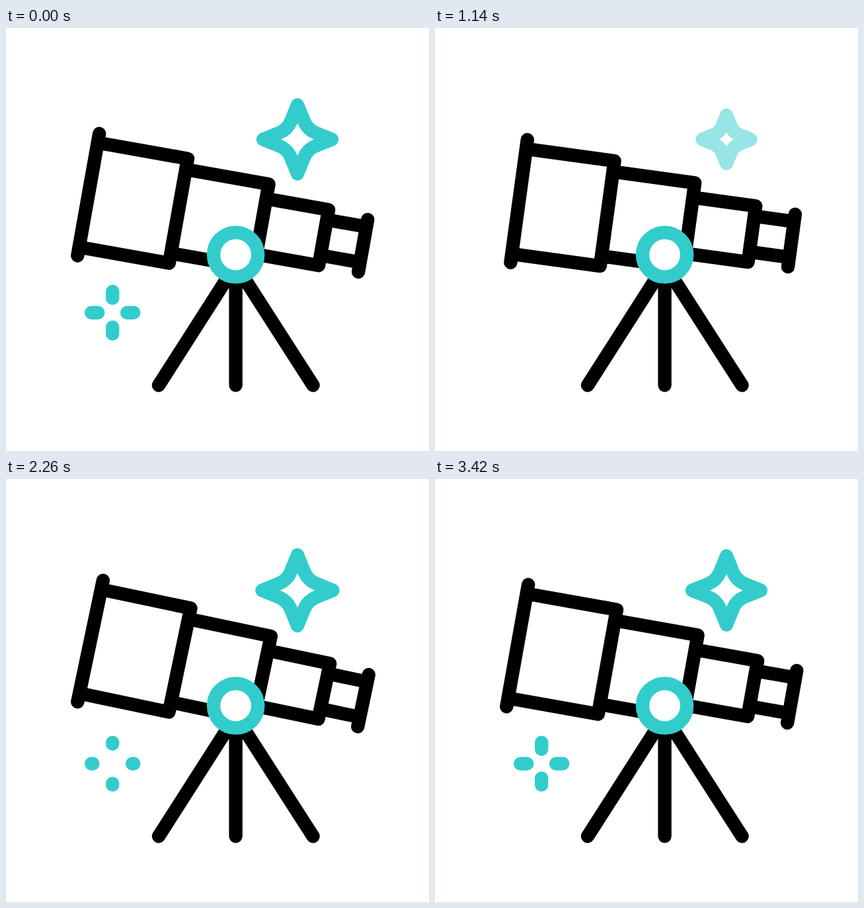
Write an HTML page that moves like this. It is 640 by 640 pixels and loops after 3.6 s.

```html
<!DOCTYPE html>
<html lang="en">
<head>
<meta charset="utf-8">
<title>Telescope</title>
<style>
  html, body { margin: 0; width: 100%; height: 100%; overflow: hidden; background: #fff; }
  svg { display: block; width: 100vw; height: 100vh; }
  path, circle { fill: none; stroke: #000; stroke-width: 20.4; stroke-linecap: round; stroke-linejoin: round; }
  .teal { stroke: #33cccc; }
</style>
</head>
<body>
<svg viewBox="0 0 640 640">
  <path id="star" class="teal" transform="translate(441 168.5)"/>
  <path id="spark" class="teal" transform="translate(161.2 430.8)"/>
  <path d="M333 381L231 540.6M347.6 385V540.6M362 381L464.5 540.6"/>
  <path id="tube"/>
  <circle class="teal" cx="347.6" cy="343" r="33.6" style="fill:#fff"/>
</svg>
<script>
const LOOP = 3600, BEGIN = 80, END = 3420, TWINKLE = 1705;
const [star, spark, tube] = ['star', 'spark', 'tube'].map(id => document.getElementById(id));

// Progress from 0 to 1 between two times, even or eased at both ends
const even = (t, from, to) => Math.min(1, Math.max(0, (t - from) / (to - from)));
const ease = (t, from, to) => (1 - Math.cos(Math.PI * even(t, from, to))) / 2;

function drawTube(t) {
  // Dips while the sections pull in, swings up as they shoot out, then rocks back
  const tilt = 10.1 - 8.8 * ease(t, BEGIN, 935) + 24.2 * ease(t, 935, 1530)
    - 25.8 * ease(t, 1530, 2940) + 10.4 * ease(t, 2940, END);
  const pull = ease(t, BEGIN, 940) - 1.33 * ease(t, 940, 1260) + 0.33 * ease(t, 1260, 1615);
  const front = -235.4 + 80 * pull, middle = -97 + 33 * pull;

  tube.setAttribute('transform', `translate(347.6 343) rotate(${tilt})`);
  tube.setAttribute('d',
    `M${front} -144.2V43.4` +
    `M${front} -130.3H${middle}V30.2H${front}` +
    `M${middle} -113.8H30.5V-10M${middle} 15H0` +
    'M30.5 -91.6H126.4V-6H30.5' +
    'M126.4 -76.2H187.2M126.4 -21.6H187.2M187.2 -87.3V-7');
}

// One arm of the star, turned four times
function starPath(size) {
  const points = [];
  for (let k = 0; k < 4; k++) {
    for (let [x, y] of [[0, -1], [.19, -.53], [.288, -.288], [.53, -.19]]) {
      for (let n = 0; n < k; n++) [x, y] = [-y, x];
      points.push(`${'LLQ '[points.length % 4]}${x * size} ${y * size}`);
    }
  }
  return points.join('').replace('L', 'M') + 'Z';
}

function drawStar(u) {
  const size = 52 + 16.5 * (ease(u, 0, 330) - ease(u, 1240, 1490))
    + 59 * (ease(u, 900, 1240) - even(u, 330, 620) ** 2);
  star.setAttribute('d', starPath(size));
  star.setAttribute('opacity', 1 - even(u, 500, 600) + even(u, 1000, 1120));
}

// Four dashes shrink outwards, then shoot out again from the middle
function drawSpark(u) {
  const back = u >= 1080;
  const a = back ? 22 : 22 + 10 * even(u, 0, 600);
  const b = back ? 22 + 33 * ease(u, 1080, 1260) - 23 * ease(u, 1260, 1525) : 32;
  spark.setAttribute('d', `M0 ${-a}V${-b}M0 ${a}V${b}M${-a} 0H${-b}M${a} 0H${b}`);
  spark.setAttribute('visibility', u > 600 && !back ? 'hidden' : 'visible');
}

function draw(t) {
  const u = t < BEGIN || t > END ? 0 : (t - BEGIN) % TWINKLE;
  drawTube(t);
  drawStar(u);
  drawSpark(u);
}

const start = performance.now();
function tick() {
  draw((performance.now() - start) % LOOP);
  requestAnimationFrame(tick);
}
tick();
</script>
</body>
</html>
```
